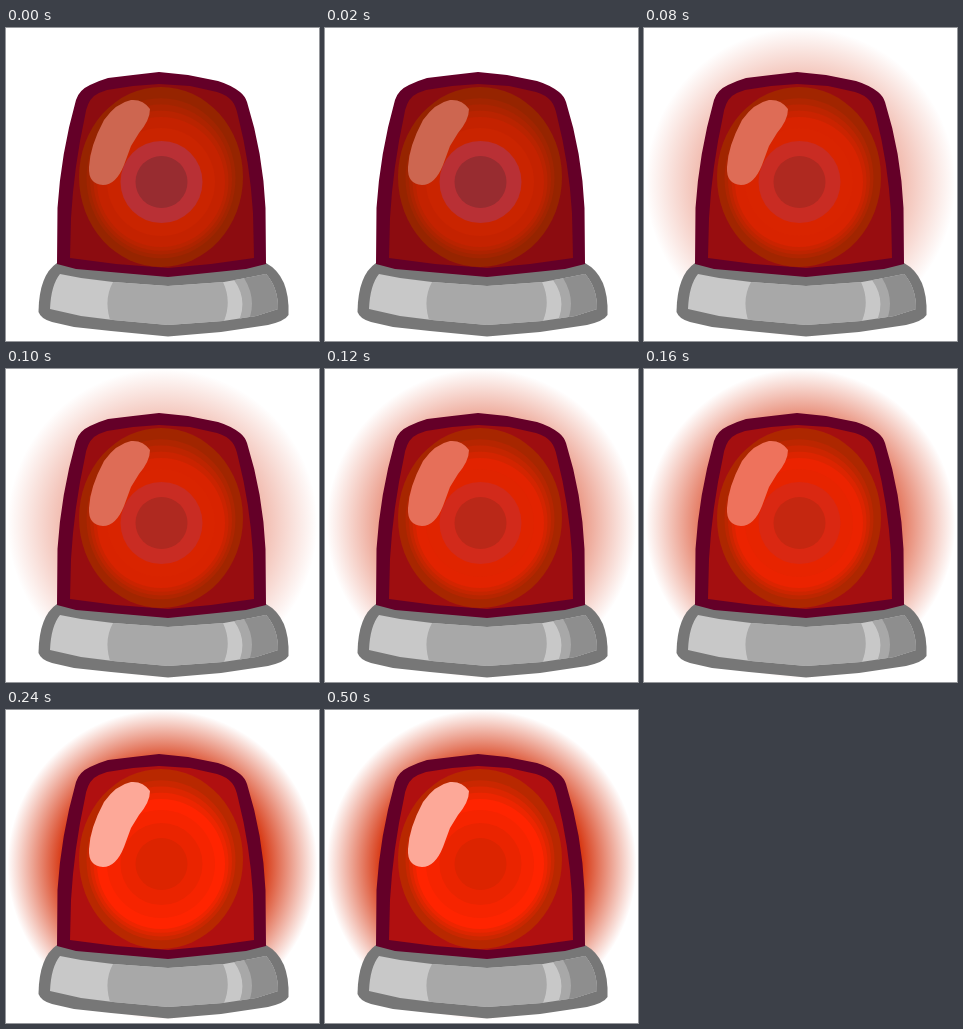
These frames come from a looping animation (313 px wide and 313 px high, 680 ms). An HTML page:

```html
<!DOCTYPE html>
<html lang="en">
<head>
<meta charset="utf-8">
<title>Warning light</title>
<style>
html, body { margin: 0; width: 100%; height: 100%; overflow: hidden; background: #fff; }
svg { display: block; width: 100vw; height: 100vh; }
</style>
</head>
<body>
<svg viewBox="0 0 313 313">
  <defs>
    <radialGradient id="halo" gradientUnits="userSpaceOnUse" cx="156.5" cy="155" r="155">
      <stop offset=".62" stop-color="#d42800"/>
      <stop offset="1" stop-color="#d42800" stop-opacity="0"/>
    </radialGradient>
    <clipPath id="metal">
      <path d="M54 246L75 250 107 254 162 258 218 254 245 249 260 246Q272 259 272 281L250 288 217 293 162 297 107 292 75 288 44 281Q45 257 54 246Z"/>
    </clipPath>
  </defs>
  <circle id="glow" cx="156.5" cy="155" r="155" fill="url(#halo)"/>

  <path fill="#777" d="M51 235Q33 247 32.500 284Q35 291 46 294L68 299 105 303 162 308.500 215 304 262 297Q279 293 282.500 287Q284 248 260 235Z"/>
  <g clip-path="url(#metal)">
    <path fill="#c8c8c8" d="M30 235H290V310H30Z"/>
    <path fill="#a8a8a8" d="M107 245V254Q97 272 105 295V310H218V293Q226 273 217 254V245Z"/>
    <path fill="#a8a8a8" d="M228 245V252Q241 270 234 290V310H290V245Z"/>
    <path fill="#8e8e8e" d="M238 245V250Q250 269 244 289V310H290V245Z"/>
  </g>

  <path fill="#640028" d="M51 236L51.500 180Q55 125 70 72Q73 62 84 57Q92 53 102 50L127 47 153 44 182 47 212 53Q225 57 234 64Q239 68 241 74Q257 125 259.500 180L260 236 240 241 162 249 70 241Z"/>
  <path id="dome" d="M64 230L65 190Q68 138 79 88Q81 74 88 68Q94 64 101 62L127 58 153 56 184 58 211 64Q221 67 226 73Q230 78 232 88Q244 135 247 185L248 230 205 236 162 240 110 236Z"/>
  <g id="lamp"></g>
  <path id="shine" d="M125 72Q137 71 144 81Q144 92 133 105L125 118 118 137Q110 157 97 157Q82 156 83 139Q84 118 98 92Q110 75 125 72Z"/>
</svg>
<script>
const STEP = 40, STEPS = 6, LOOP = 680;
const $ = id => document.getElementById(id);

const mix = (a, b, k) => a.map((v, i) => v + (b[i] - v) * k);
const css = c => `rgb(${c.map(Math.round).join()})`;

// Each part goes from its dim colour to its lit colour.
const parts = [];
const addPart = (node, dim, lit, peak = lit) => parts.push({ node, dim, lit, peak });

function addRing(cx, cy, rx, ry, dim, lit) {
  const node = document.createElementNS("http://www.w3.org/2000/svg", "ellipse");
  Object.entries({ cx, cy, rx, ry }).forEach(([key, value]) => node.setAttribute(key, value));
  $("lamp").append(node);
  addPart(node, dim, lit);
}

addPart($("dome"), [140, 12, 16], [176, 16, 16]);
// The reflection flares at full brightness.
addPart($("shine"), [205, 102, 80], [255, 120, 98], [253, 168, 152]);

const RIM_DIM = [150, 36, 0], RIM_LIT = [184, 40, 0];
const BANDS = 4;
addRing(155, 149, 82, 90, RIM_DIM, RIM_LIT);
for (let i = 1; i <= BANDS; i++) {
  const k = i / BANDS;
  addRing(155, 149 + 5 * k, 78 - 14 * k, 85 - 20 * k,
    mix(RIM_DIM, [196, 34, 0], k), mix(RIM_LIT, [255, 36, 0], k));
}
addRing(155, 154, 54, 54, [202, 36, 0], [246, 36, 0]);
addRing(155.5, 154, 41, 41, [185, 48, 53], [234, 36, 0]);
addRing(155.5, 154, 26, 26, [152, 44, 48], [220, 36, 0]);

function draw(time) {
  const level = Math.min(STEPS, Math.floor(time % LOOP / STEP)) / STEPS;
  $("glow").setAttribute("opacity", level);
  for (const { node, dim, lit, peak } of parts) {
    node.setAttribute("fill", css(level < 1 ? mix(dim, lit, level) : peak));
  }
}

const start = performance.now();
function tick() {
  draw(performance.now() - start);
  requestAnimationFrame(tick);
}
tick();
</script>
</body>
</html>
```
